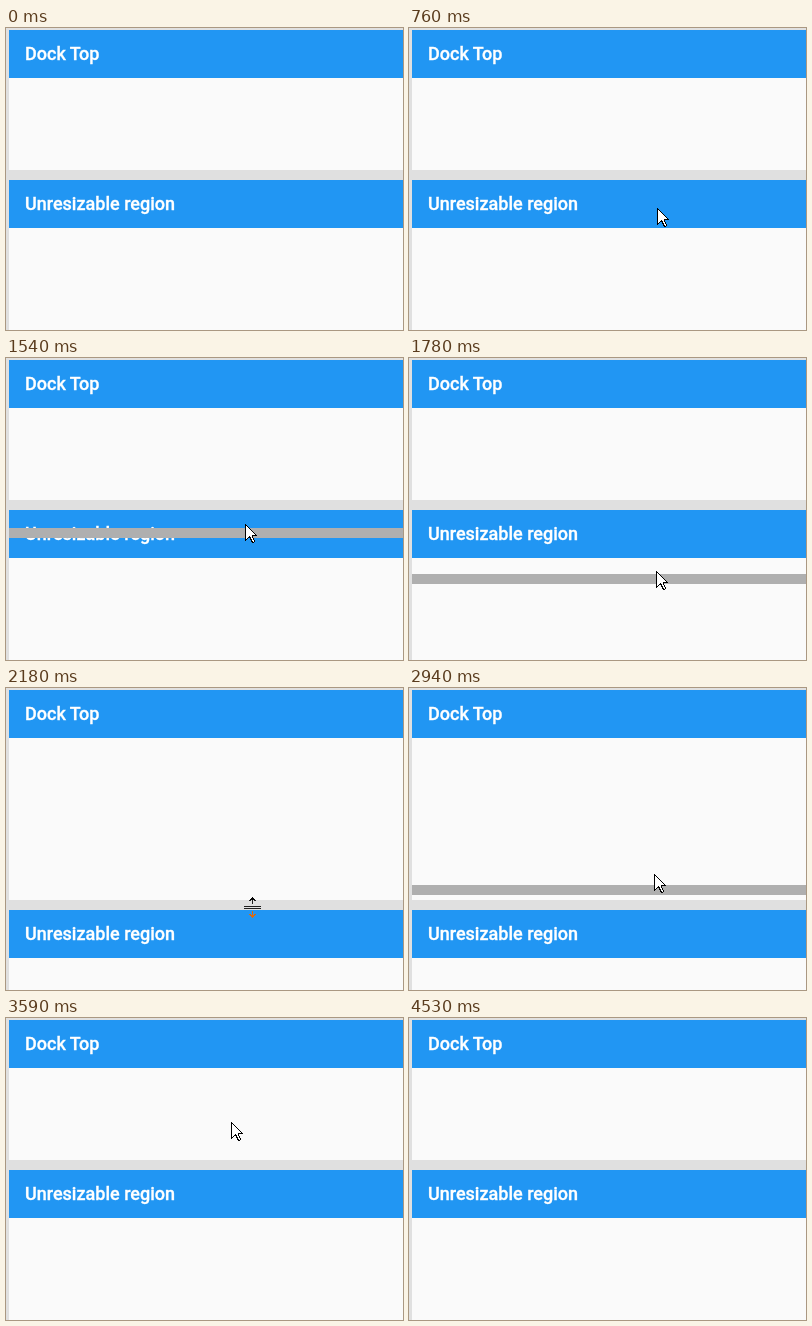
Animation of 397 by 302 pixels, one loop 5090 ms. Source, as an HTML page:

```html
<!DOCTYPE html>
<html lang="en">
<head>
<meta charset="utf-8">
<title>Resizable dock</title>
<style>
  html, body { margin: 0; width: 100%; height: 100%; overflow: hidden; background: #e0e0e0; }
  body { position: relative; }
  section, #ghost, svg { position: absolute; }
  section { left: 3px; right: 0; background: #fafafa; overflow: hidden; }
  h1 {
    margin: 0; padding-left: 16px; height: 48px; background: #2196f3; color: #fff;
    font: 500 18px/48px Roboto, sans-serif; white-space: nowrap;
    -webkit-text-stroke: .35px #fff;
  }
  #dock { top: 2px; }
  #region { bottom: 0; }
  #ghost { left: 3px; right: 0; height: 10px; background: #afafaf; }
  svg { left: 0; top: 0; shape-rendering: crispEdges; }
  #arrow { fill: #fff; stroke: #000; stroke-linejoin: round; }
  #resize { fill: #fff; mix-blend-mode: difference; }
</style>
</head>
<body>
<section id="dock"><h1>Dock Top</h1></section>
<section id="region"><h1>Unresizable region</h1></section>
<div id="ghost"></div>
<svg id="arrow" width="12" height="19">
  <path d="M.5.5V16.5L4.5 12.5L7.5 18.5H8.5L9.5 17.5L7.5 12.5V11.5H11.5Z"/>
</svg>
<svg id="resize" width="17" height="21">
  <path d="M8 0h1v1h1v1h1v1h1v1h-2v-1h-1v4h-1v-4h-1v1h-2v-1h1v-1h1v-1h1z
    M0 9h17v1h-17z M0 11h17v1h-17z
    M8 21h1v-1h1v-1h1v-1h1v-1h-2v1h-1v-4h-1v4h-1v-1h-2v1h1v1h1v1h1z"/>
</svg>
<script>
const LOOP = 5090, HOLD = 76, BAR_MIN = 152;

// Pointer strokes; bar gives the top of the dragged bar
const moves = [
  { start: 420, end: 910, from: [276, 290], to: [243, 161] },
  { start: 990, end: 1066, from: [243, 152], to: [241, 149] },
  { start: 1400, end: 1940, from: [236, 147], to: [248, 219], bar: [152, 222] },
  { start: 2940, end: 3360, from: [245, 186], to: [225, 104], bar: [197, 115] },
  { start: 3744, end: 4400, from: [225, 104], to: [343, 290] },
];

const el = id => document.getElementById(id);
const show = (node, on) => node.style.display = on ? "block" : "none";
const place = (node, x, y) => node.style.transform = `translate(${x}px, ${y}px)`;
const mix = (a, b, p) => Math.round(a + (b - a) * p);
const easeOut = p => 1 - (1 - p) ** 2;

function draw(t) {
  const within = (a, b) => t >= a && t < b;
  const { start, end, from, to, bar } = moves.filter(m => m.start <= t).pop() || moves[0];
  const held = Math.floor((t - start) / HOLD) * HOLD;
  const p = easeOut(Math.min(1, Math.max(0, held / (end - start))));
  const x = mix(from[0], to[0], p), y = mix(from[1], to[1], p);

  const split = within(2180, 3590) ? 212 : 142;
  el("dock").style.height = split - 2 + "px";
  el("region").style.top = split + 10 + "px";

  show(el("ghost"), within(1400, 2180) || within(2940, 3590));
  if (bar) el("ghost").style.top = Math.max(BAR_MIN, mix(...bar, p)) + "px";

  const resizing = within(990, 1470) || within(2180, 2940);
  show(el("resize"), resizing);
  show(el("arrow"), !resizing && within(420, 4530));
  place(el("resize"), x - 10, y - 10);
  place(el("arrow"), x, y);
}

const start = performance.now();
function tick() {
  draw((performance.now() - start) % LOOP);
  requestAnimationFrame(tick);
}
tick();
</script>
</body>
</html>
```
